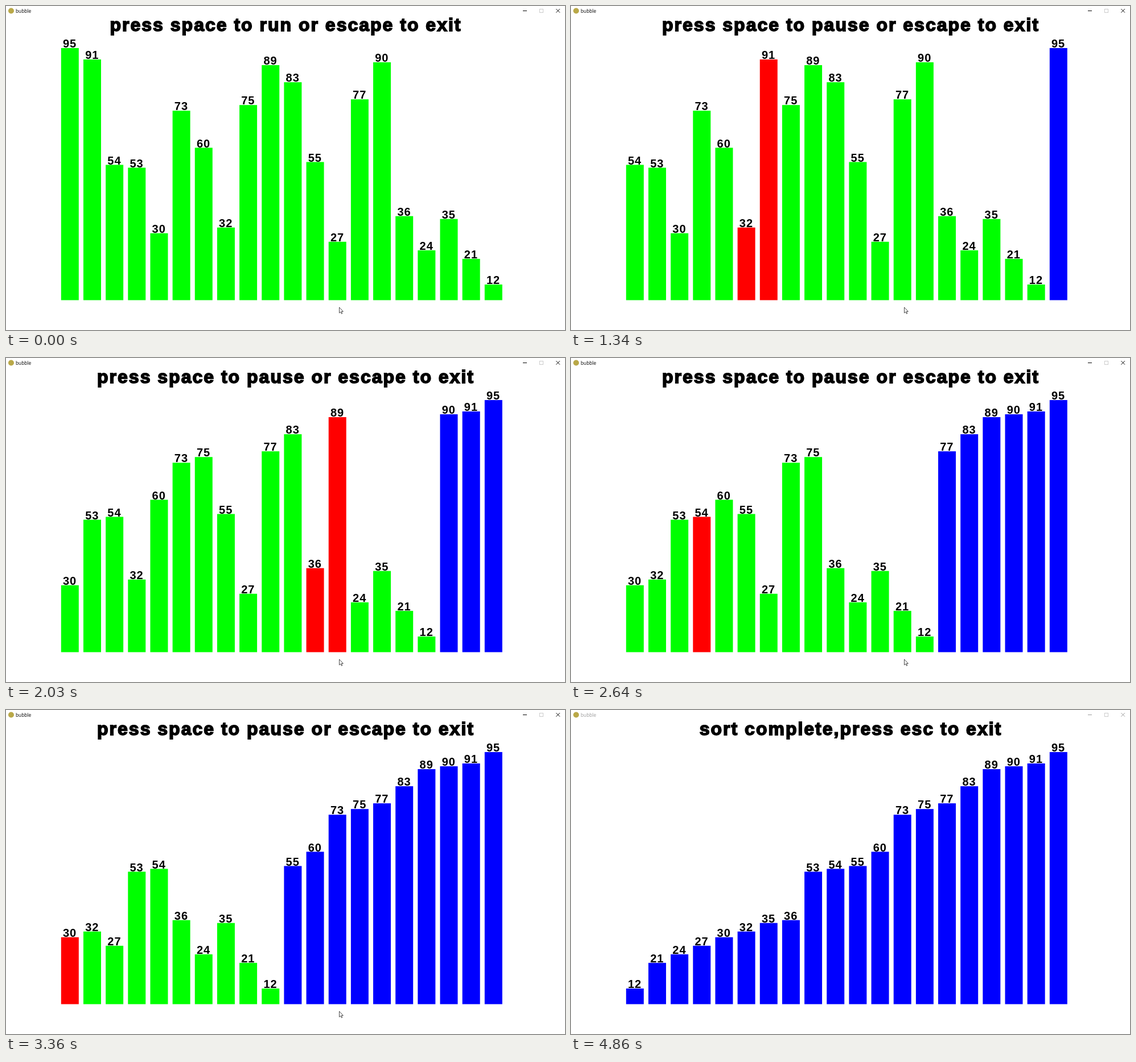
Animation of 982x570 px, one loop 4990 ms. Source, as an HTML page:

```html
<!DOCTYPE html>
<html lang="en">
<head>
<meta charset="utf-8">
<title>bubble</title>
<style>
  html, body { margin: 0; width: 100%; height: 100%; overflow: hidden; background: #fff; }
  svg { display: block; width: 100vw; height: 100vh; }
  #head {
    font: bold 32px "Liberation Sans", Arial, sans-serif; letter-spacing: 2px;
    text-anchor: middle; stroke: #000; stroke-width: 1.8px; white-space: pre;
  }
  #bars text {
    font: bold 20px "Liberation Sans", Arial, sans-serif; letter-spacing: 1px;
    text-anchor: middle;
  }
  #name { font: 8.3px "Open Sans", sans-serif; }
</style>
</head>
<body>
<svg viewBox="0 0 982 570" preserveAspectRatio="none">
  <circle cx="9" cy="8.5" r="5" fill="#b9a848"/>
  <g id="chrome">
    <text id="name" x="17" y="11.5" fill="currentColor">bubble</text>
    <path d="M908 8.5h7M966.5 5.2l6.4 6.4M972.9 5.2l-6.4 6.4" stroke="currentColor" fill="none"/>
  </g>
  <rect x="937.5" y="5.5" width="6" height="6" fill="none" stroke="#ccc"/>
  <text id="head" x="491.5" y="44"></text>
  <g id="bars"></g>
  <path id="cursor" d="M.5 .5V10.6L2.8 8.5 4.4 12 5.8 11.4 4.3 8H7.3Z" fill="#fff" stroke="#222" stroke-width=".8"/>
</svg>
<script>
const LOOP = 4990, START = 928, SLOT = 40.52, BASE = 517.5;
const VALUES = [95, 91, 54, 53, 30, 73, 60, 32, 75, 89, 83, 55, 27, 77, 90, 36, 24, 35, 21, 12];
const GREEN = '#0f0', RED = '#f00', BLUE = '#00f';
const $ = id => document.getElementById(id);

function add(parent, tag, attrs) {
  const el = document.createElementNS('http://www.w3.org/2000/svg', tag);
  set(el, attrs);
  return parent.appendChild(el);
}
function set(el, attrs) {
  for (const key in attrs) el.setAttribute(key, attrs[key]);
}

// One snapshot per comparison, taken after a possible swap.
function bubbleSort(list) {
  const a = [...list], states = [{ a: [...a], sorted: a.length, red: [] }];
  for (let end = a.length - 1; end > 0; end--) {
    for (let j = 0; j < end; j++) {
      const red = [j];
      if (a[j] > a[j + 1]) {
        [a[j], a[j + 1]] = [a[j + 1], a[j]];
        red.push(j + 1);
      }
      states.push({ a: [...a], sorted: end + 1, red });
    }
  }
  states.push({ a, sorted: 0, red: [] });
  return states;
}

const states = bubbleSort(VALUES), last = states.length - 1;
const bars = VALUES.map((_, i) => {
  const x = 96.8 + 39.16 * i;
  return {
    rect: add($('bars'), 'rect', { x, width: 31 }),
    label: add($('bars'), 'text', { x: x + 15.3 })
  };
});

// Sorting runs at about 60 steps a second, shown at about 25, with one short stall.
function stepAt(t) {
  if (t < START) return 0;
  let slot = Math.floor((t - START) / SLOT);
  if (slot === 63) slot = 62;
  const n = Math.floor(1.1 + 2.43 * slot - (slot > 63 ? 1.7 : 0));
  return Math.min(n, last);
}

let shown = -1;
function showStep(n) {
  if (n === shown) return;
  shown = n;
  const { a, sorted, red } = states[n];
  bars.forEach(({ rect, label }, i) => {
    const height = 5.012 * a[i] - 32.6, y = BASE - height;
    const fill = red.includes(i) ? RED : i >= sorted ? BLUE : GREEN;
    set(rect, { y, height, fill });
    set(label, { y: y - 0.8 });
    label.textContent = a[i];
  });
  $('head').textContent = n === last ? 'sort complete,press esc to exit'
    : `press space to ${n ? 'pause' : 'run'} or escape to exit`;
}

function showCursor(t) {
  const slotTime = START + Math.floor((t - START) / SLOT) * SLOT;
  const p = Math.min(1, Math.max(0, (slotTime - 4255) / 360));
  const e = p * p * (3 - 2 * p);
  set($('cursor'), { transform: `translate(${585 + 319 * e} ${529.5 + 41 * e})` });
}

function showChrome(t) {
  const level = t < 4700 ? 0 : Math.min(5, Math.floor((t - 4700) / 40) + 1);
  const c = level * 31;
  $('chrome').style.color = `rgb(${c},${c},${c})`;
}

function draw(now) {
  const t = now % LOOP;
  showStep(stepAt(t));
  showCursor(t);
  showChrome(t);
}

const t0 = performance.now();
function tick() {
  draw(performance.now() - t0);
  requestAnimationFrame(tick);
}
tick();
</script>
</body>
</html>
```
